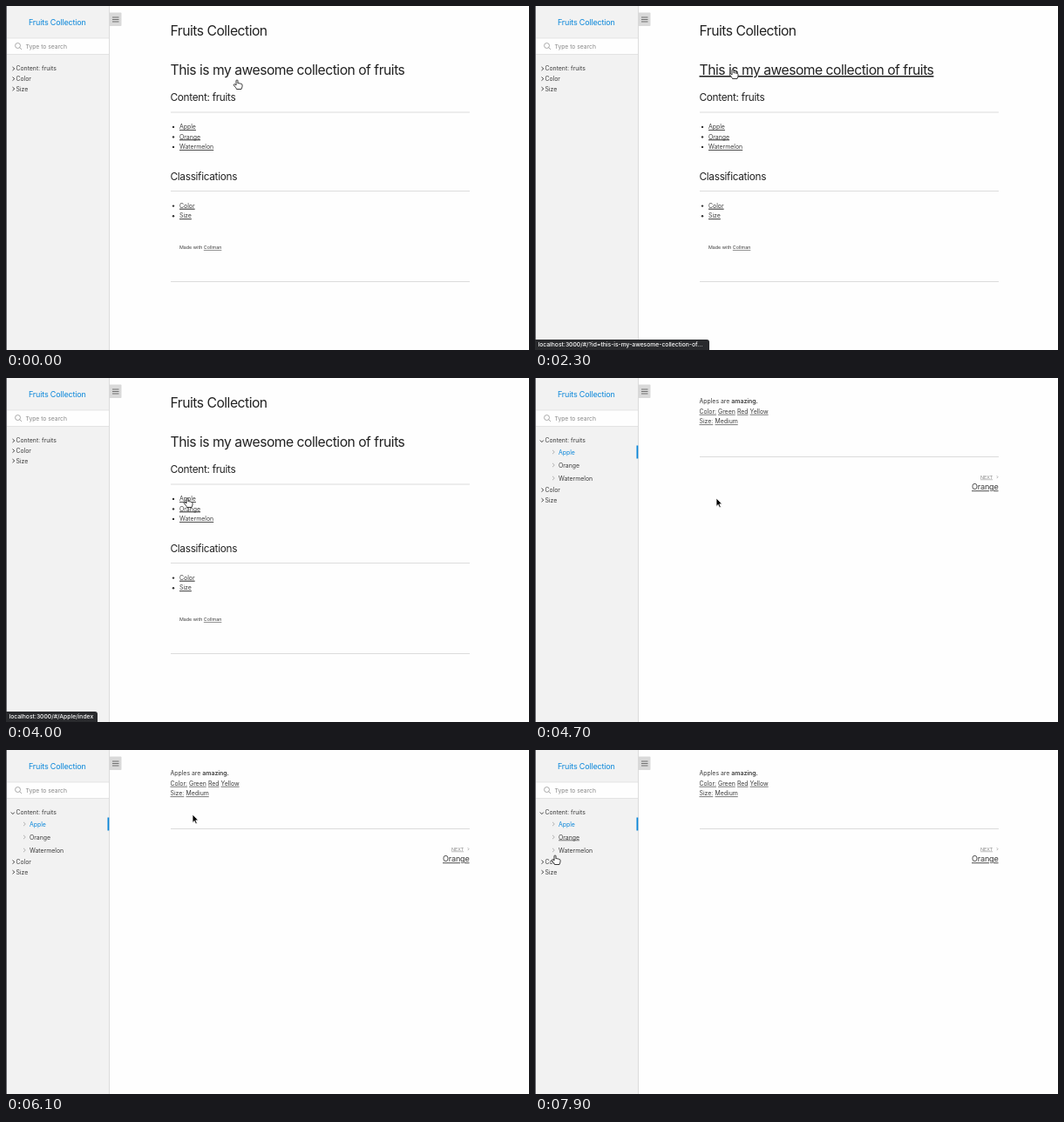
These frames come from a looping animation (600 px wide and 395 px high, 8 s). An HTML page:

```html
<!DOCTYPE html>
<html lang="en">
<head>
<meta charset="utf-8">
<title>Fruits Collection</title>
<style>
html, body { margin: 0; width: 100%; height: 100%; overflow: hidden; background: #fefefe; }
svg { display: block; width: 600px; height: 395px; }
text { font: 6.9px Inter, Roboto, sans-serif; fill: #3c3c3c; white-space: pre; }
.h1 { font-size: 15.7px; letter-spacing: -.5px; fill: #222; }
.h2 { font-size: 11.8px; letter-spacing: -.3px; fill: #222; }
.brand { font-size: 9px; letter-spacing: -.18px; }
.next { font-size: 9.1px; letter-spacing: -.2px; }
.small { font-size: 5.35px; }
.blue { fill: #0b87da; }
.grey { fill: #888; }
.u { text-decoration: underline; }
.b { font-weight: 600; }
.status { font-size: 6.75px; font-weight: 500; fill: #fff; }
.rule { stroke: #dcdcdc; }
.chev { fill: none; stroke: #333; stroke-width: .9; }
.pale { stroke: #aaa; }
</style>
</head>
<body>
<svg viewBox="0 0 600 395">
  <rect width="118" height="395" fill="#f2f2f2"/>
  <path class="rule" d="M118.5 0V395"/>
  <rect x="1" y="37" width="117" height="18.5" fill="#fefefe"/>
  <path class="rule" d="M1 37H118M1 55.5H118" stroke-width=".7"/>
  <rect width="1" height="395" fill="#66666c"/>
  <path d="M118 7.5H131.5Q132.5 7.5 132.5 8.5V22Q132.5 23 131.5 23H118Z" fill="#d9d9d9"/>
  <path d="M122 13H129.500M122 15.500H129.500M122 18H129.500" stroke="#555" stroke-width=".8"/>
  <text class="brand blue" x="26" y="21.500">Fruits Collection</text>
  <g fill="none" stroke="#888" stroke-width=".7"><circle cx="13.500" cy="45.500" r="3"/><path d="M15.700 47.700L18 50"/></g>
  <text class="grey" x="22.500" y="48.700" style="font-size:6.75px">Type to search</text>
  <text x="11.400" y="74.400">Content: fruits</text>

  <g id="home">
    <path class="chev" d="M7.500 70L9.800 72L7.500 74M7.500 81.600L9.800 83.600L7.500 85.600M7.500 93.100L9.800 95.100L7.500 97.100"/>
    <text x="11.400" y="86">Color</text>
    <text x="11.400" y="97.500">Size</text>
    <text class="h1" x="188.500" y="33.700">Fruits Collection</text>
    <text class="h1" x="188.500" y="79" id="headline">This is my awesome collection of fruits</text>
    <text class="h2" x="188.500" y="108.900" id="content">Content: fruits</text>
    <text class="h2" x="188.500" y="199.900">Classifications</text>
    <path class="rule" d="M189 122H532M189 212.500H532M189 316.500H532"/>
    <g fill="#333"><circle cx="192" cy="138.900" r="1.200"/><circle cx="192" cy="150.400" r="1.200"/><circle cx="192" cy="161.900" r="1.200"/><circle cx="192" cy="229.600" r="1.200"/><circle cx="192" cy="241.200" r="1.200"/></g>
    <g class="u">
      <text class="u" x="199" y="141">Apple</text>
      <text class="u" x="199" y="152.500">Orange</text>
      <text class="u" x="199" y="164">Watermelon</text>
      <text class="u" x="199" y="231.800">Color</text>
      <text class="u" x="199" y="243.400">Size</text>
    </g>
    <text class="small" x="199" y="279.400">Made with <tspan class="u">Collman</tspan></text>
  </g>

  <g id="apple">
    <path class="chev" d="M5.800 71.500L7.800 73.600L9.800 71.500M7.500 126.600L9.800 128.600L7.500 130.600M7.500 138.200L9.800 140.200L7.500 142.200"/>
    <path class="chev pale" d="M20 82.800L22.300 85L20 87.200M20 97.800L22.300 100L20 102.200M20 112.800L22.300 115L20 117.200"/>
    <text class="blue" x="27" y="87.500" id="navApple">Apple</text>
    <text x="27" y="102.500" id="navOrange">Orange</text>
    <text x="27" y="117.500">Watermelon</text>
    <rect x="116.500" y="77.500" width="1.800" height="15" fill="#0b87da"/>
    <text x="11.400" y="131">Color</text>
    <text x="11.400" y="142.600">Size</text>
    <text x="188.500" y="29.200">Apples are <tspan class="b">amazing.</tspan></text>
    <text class="u" x="188.500" y="40.800">Color:</text>
    <text class="u" x="210" y="40.800">Green</text>
    <text class="u" x="232" y="40.800">Red</text>
    <text class="u" x="246.500" y="40.800">Yellow</text>
    <text class="u" x="188.500" y="52.400">Size:</text>
    <text class="u" x="206.500" y="52.400">Medium</text>
    <path class="rule" d="M189 90.500H532"/>
    <text class="small grey u" x="511" y="115.600">NEXT</text>
    <path class="chev pale" d="M529.800 112.300L531 113.700L529.800 115.100" stroke-width=".6"/>
    <text class="next u" x="501" y="128.300">Orange</text>
  </g>

  <g id="status">
    <path id="bar" fill="#292a2d"/>
    <text class="status" x="3.500" y="391.400" id="url"></text>
  </g>
  <g id="cursor" stroke-linejoin="round">
    <path id="arrow" d="M0 0V9.500L2.200 7.400L3.700 10.900L5.300 10.200L3.800 6.800H6.700Z" stroke="#fff" stroke-width=".8"/>
    <path id="hand" d="M-1 .8C-1-.3 1-.3 1 .8V4C1.500 3.200 2.700 3.400 2.800 4.200C3.400 3.500 4.400 3.800 4.500 4.600C5.200 4.200 6 4.600 6 5.400V7.500C6 8.600 5.200 9.200 5 10.500H-.5C-.8 9-2.600 7.400-3.600 6C-4.200 5-3 4.300-2.200 5L-1 6Z" fill="#fff" stroke="#222" stroke-width=".9"/>
  </g>
</svg>
<script>
const $ = id => document.getElementById(id);
const LOOP = 8000, STEP = 100;

// Pointer path: time, x, y
const path = [
  [0, 265, 85], [300, 261, 81], [900, 232, 60], [1400, 228, 56], [1600, 228, 59],
  [1800, 227, 70], [2300, 227, 73], [2800, 227, 75], [3200, 223, 95], [3600, 218, 110],
  [3900, 209, 136], [4000, 208, 138], [5200, 208, 138], [5700, 240, 105], [5900, 247, 88],
  [6100, 214, 74], [6200, 210, 73], [7000, 56, 59], [7100, 54, 58], [7300, 56, 66],
  [7600, 42, 98], [7900, 23, 121]
];
const handTimes = [[0, 800], [1700, 3000], [3100, 3600], [3800, 4400], [7300, LOOP]];
const hovers = {
  headline: [[300, 800], [1700, 3000]],
  content: [[3100, 3700]],
  navApple: [[7400, 7600]],
  navOrange: [[7600, LOOP]]
};
// Link preview: start, end, bar width, address
const links = [
  [1900, 3100, 200, '?id=this-is-my-awesome-collection-of…'],
  [3100, 3700, 127, '?id=content-fruits'],
  [3700, 4500, 105, 'Apple/index']
];

const within = (t, spans) => spans.some(([a, b]) => t >= a && t < b);
const show = (id, on) => { $(id).style.display = on ? '' : 'none'; };

function pointerAt(t) {
  const i = path.findIndex(p => p[0] > t);
  if (i < 0) return path[path.length - 1].slice(1);
  const [t0, x0, y0] = path[i - 1], [t1, x1, y1] = path[i];
  const k = (t - t0) / (t1 - t0);
  return [x0 + (x1 - x0) * k, y0 + (y1 - y0) * k];
}

function draw(t) {
  show('home', t < 4400);
  show('apple', t >= 4400);
  for (const id in hovers) $(id).classList.toggle('u', within(t, hovers[id]));

  const link = links.find(([a, b]) => t >= a && t < b);
  show('status', link);
  if (link) {
    const w = link[2];
    $('bar').setAttribute('d', `M0 383H${w - 3}Q${w} 383 ${w} 386V395H0Z`);
    $('url').textContent = 'localhost:3000/#/' + link[3];
  }

  const hand = within(t, handTimes);
  show('hand', hand);
  show('arrow', !hand);
  $('cursor').setAttribute('transform', `translate(${pointerAt(t)})`);
}

const start = performance.now();
function tick() {
  const t = (performance.now() - start) % LOOP;
  draw(Math.floor(t / STEP) * STEP);
  requestAnimationFrame(tick);
}
tick();
</script>
</body>
</html>
```
